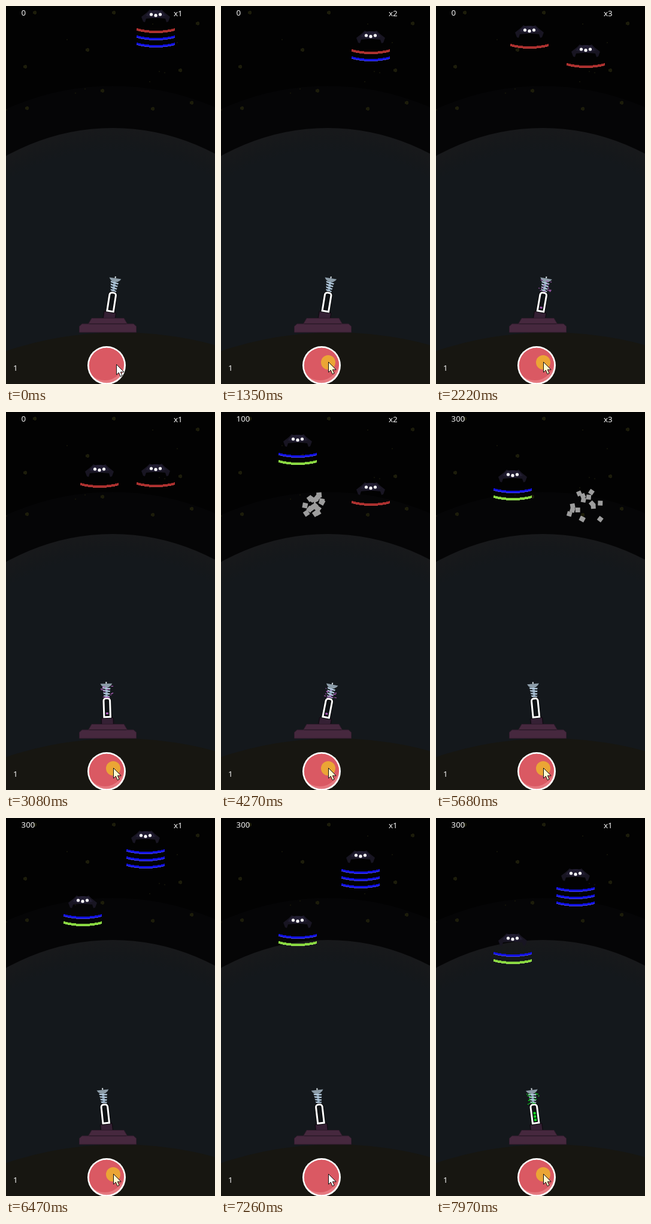
Animation, 349 px wide and 629 px high, one loop 8000 ms. Source, as an HTML page with a canvas:

```html
<!DOCTYPE html>
<html lang="en">
<head>
<meta charset="utf-8">
<title>Planet defence</title>
<style>
html, body { margin: 0; width: 100%; height: 100%; overflow: hidden; background: #000; }
canvas { display: block; width: 349px; height: 629px; }
</style>
</head>
<body>
<canvas id="stage"></canvas>
<script>
const W = 349, H = 629, LOOP = 8000;
const canvas = document.getElementById('stage');
const ctx = canvas.getContext('2d');
const dpr = window.devicePixelRatio || 1;
canvas.width = W * dpr;
canvas.height = H * dpr;

const SHIELD = {
  red: ['#a92e2d', '#c0403c'],
  blue: ['#1010e0', '#4646f4'],
  green: ['#86d43e', '#a0ee58']
};
const PIVOT = { x: 170, y: 534 };
const HOLD = 500;
const pressStarts = [350, 1200, 1950, 2700, 4000, 5500, 6400, 7500];

// y is the height at time 0, extrapolated along the constant speed v
const ships = [
  { x: 250, y: 14, v: 0.026, born: 0, dies: 5280, shields: ['red', 'blue', 'blue'] },
  { x: 156, y: -102, v: 0.064, born: 1830, dies: 3950, shields: ['red'] },
  { x: 128, y: -133.4, v: 0.0418, born: 3540, dies: Infinity, shields: ['blue', 'green'] },
  { x: 233, y: -243.4, v: 0.0421, born: 6080, dies: Infinity, shields: ['blue', 'blue', 'blue'] }
];
const shots = [
  { time: 1100, hit: ships[0] },
  { time: 2050, hit: ships[0] },
  { time: 2800 },
  { time: 3950, hit: ships[1] },
  { time: 5280, hit: ships[0] },
  { time: 6450 }
];

const shipY = (s, t) => s.y + s.v * t;

function random(seed) {
  return () => {
    seed = (seed * 16807) % 2147483647;
    return seed / 2147483647;
  };
}

function disc(x, y, r, fill) {
  ctx.fillStyle = fill;
  ctx.beginPath();
  ctx.arc(x, y, r, 0, Math.PI * 2);
  ctx.fill();
}

function rect(x, y, w, h, fill) {
  ctx.fillStyle = fill;
  ctx.fillRect(x, y, w, h);
}

function poly(points, fill, stroke, width = 1) {
  ctx.beginPath();
  points.forEach(([x, y]) => ctx.lineTo(x, y));
  ctx.closePath();
  ctx.fillStyle = fill;
  ctx.fill();
  if (stroke) {
    ctx.strokeStyle = stroke;
    ctx.lineWidth = width;
    ctx.stroke();
  }
}

const mirror = half => half.concat(half.map(([x, y]) => [-x, y]).reverse());

function at(x, y, angle, draw) {
  ctx.save();
  ctx.translate(x, y);
  ctx.rotate(angle);
  draw();
  ctx.restore();
}

function drawSky() {
  rect(0, 0, W, H, '#020202');
  disc(178, 566, 433, '#050506');
  const big = [[48, 11], [180, 11], [320, 29], [136, 73], [32, 101],
               [161, 141], [35, 170], [245, 171], [291, 107], [310, 161]];
  for (const [x, y] of big) {
    rect(x - 3, y - 2, 6, 4, '#1c1c0a');
    rect(x - 1, y - 3, 3, 6, '#1c1c0a');
  }
  const rnd = random(7);
  for (let i = 0; i < 9; i++) rect(Math.round(rnd() * W), Math.round(20 + rnd() * 165), 2, 2, '#121207');
  const air = ctx.createRadialGradient(178, 566, 325, 178, 566, 363);
  air.addColorStop(0, '#14181c');
  air.addColorStop(0.35, '#15181b');
  air.addColorStop(1, '#18191b');
  disc(178, 566, 363, air);
  disc(191, 1143, 600, '#171611');
}

// one column per pixel gives the stepped edge
function drawShield(y, name) {
  const [dark, light] = SHIELD[name];
  for (let x = -32; x < 32; x++) {
    const top = y + Math.round(4 * (1 - (x / 32) ** 2));
    rect(x, top, 1, 3, dark);
    rect(x, top + 3, 1, 1, light);
  }
}

function drawShip(s, t) {
  at(s.x, Math.round(shipY(s, t)), 0, () => {
    poly(mirror([[-6, -6], [-10, -8], [-15, -3], [-24, 4], [-21, 12],
                 [-18, 13], [-16, 7], [-5, 6]]), '#181522');
    poly(mirror([[-3, -7], [-9, -6], [-17, 2], [-4, 5]]), '#211d31');
    for (const side of [-1, 0, 1]) disc(side * 7.5, side ? 0 : 1.7, 2.6, '#fff');
    const lost = shots.filter(shot => shot.hit === s && shot.time <= t).length;
    s.shields.slice(0, s.shields.length - lost).forEach((name, i) => drawShield(23 + i * 12, name));
  });
}

function drawDebris(s, t) {
  const age = t - s.dies, life = 850;
  if (age > life) return;
  const rnd = random(s.x * 91);
  const reach = 32 * (age / 400) ** 1.5;
  const size = Math.min(11 - age / 130, (life - age) / 40);
  for (let i = 0; i < 15; i++) {
    const dx = (rnd() + rnd() - 1) * reach;
    const dy = (rnd() + rnd() - 0.8) * reach;
    at(s.x + dx, shipY(s, s.dies) + dy, rnd() * 6, () => {
      rect(-size / 2, -size / 2, size, size, '#9d9d9d');
    });
  }
}

function drawCharge(age, t) {
  if (age < 200) return;
  const green = age >= 420;
  const color = green ? '#12dc22' : '#a85bb4';
  const rnd = random(101 + Math.floor(t / 80) * 37);
  for (let i = 0; i < 16; i++) {
    const x = (rnd() - 0.5) * 20, y = -79 + rnd() * 21;
    rect(x, y, 1.5 + rnd() * 3, 1.2, color);
  }
  for (let i = 0; i < (green ? 3 : 1); i++) rect(-2, -34 - i * 5.5, 4, green ? 4 : 3, color);
}

function drawCannon(t, pressed) {
  const target = ships.filter(s => t >= s.born && t < s.dies)
    .reduce((a, b) => shipY(b, t) > shipY(a, t) ? b : a);
  const angle = Math.atan2(target.x - PIVOT.x, PIVOT.y - shipY(target, t));
  at(PIVOT.x, PIVOT.y, angle, () => {
    poly(mirror([[-8, -26], [-10, -24], [-10, -13]]), '#352034', '#130c14', 1.5);
    rect(-7, -27, 14, 2, '#8497a8');

    // coil and muzzle
    rect(-2, -78, 4, 20, '#7f96aa');
    for (let i = 0; i < 4; i++) {
      const y = -75 + i * 4.4, w = 7 - i * 0.6;
      poly([[-w, y - 1.5], [w, y + 0.6], [w - 1, y + 2.8], [-w + 1, y + 1]], '#b4cadd');
    }
    poly(mirror([[-10, -82], [-8, -79], [-4, -76]]), '#8c9ca8');
    rect(-1, -85, 2, 3, '#d5dde2');

    // chamber
    ctx.beginPath();
    ctx.roundRect(-5.3, -57.5, 10.6, 31, [4, 4, 0, 0]);
    ctx.fillStyle = '#101316';
    ctx.fill();
    for (const [color, width] of [['#07080a', 5], ['#fff', 3]]) {
      ctx.strokeStyle = color;
      ctx.lineWidth = width;
      ctx.stroke();
    }
    if (pressed !== undefined) drawCharge(t - pressed, t);
  });
}

function drawBase() {
  at(170, 0, 0, () => {
    poly(mirror([[-27, 519.5], [-32, 528], [-32, 532]]), '#46283e', '#2d1a2a');
    poly(mirror([[-33, 529], [-43, 529], [-47.5, 533], [-47.5, 543]]), '#46283e', '#321d2e');
    rect(-31, 528, 62, 1.5, '#2d1a2a');
  });
}

function drawButton(pressed) {
  disc(168, 598, 32, '#fff');
  ctx.save();
  ctx.beginPath();
  ctx.arc(168, 598, 29.2, 0, Math.PI * 2);
  ctx.clip();
  rect(136, 566, 64, 63, '#e57980');
  disc(165, 590, 33, '#da5963');
  ctx.restore();
  if (pressed !== undefined) disc(179, 593, 12, '#eba535');
}

function drawCursor(t, pressed) {
  const p = Math.min(1, Math.max(0, (t - 80) / 200));
  const k = p * p * (3 - 2 * p);
  const fill = pressed === undefined ? '#fff' : '#fffbd0';
  at(184.5 - 5 * k, 596.5 - 4 * k, 0, () => {
    poly([[0, 0], [0, 17], [3.8, 13.5], [6.6, 20], [9.6, 18.7], [6.8, 12.6], [12.6, 12.6]], fill, '#111');
  });
}

function drawText(t) {
  let score = 0, combo = 1;
  for (const { time, hit } of shots) {
    if (time > t) break;
    if (hit && hit.dies === time) score += 100 * combo;
    combo = hit ? combo + 1 : 1;
  }
  ctx.fillStyle = '#f2f2f2';
  ctx.font = '13.33px "Noto Sans", sans-serif';
  ctx.fillText(score, 25.6, 16);
  ctx.fillText('x' + combo, 280, 17);
  ctx.fillText('1', 12, 607);
}

function frame() {
  const t = performance.now() % LOOP;
  const pressed = pressStarts.find(start => t >= start && t < start + HOLD);
  ctx.setTransform(dpr, 0, 0, dpr, 0, 0);
  drawSky();
  drawCannon(t, pressed);
  drawBase();
  for (const s of ships) {
    if (t < s.born) continue;
    if (t < s.dies) drawShip(s, t);
    else drawDebris(s, t);
  }
  drawButton(pressed);
  drawText(t);
  drawCursor(t, pressed);
  requestAnimationFrame(frame);
}
frame();
</script>
</body>
</html>
```
